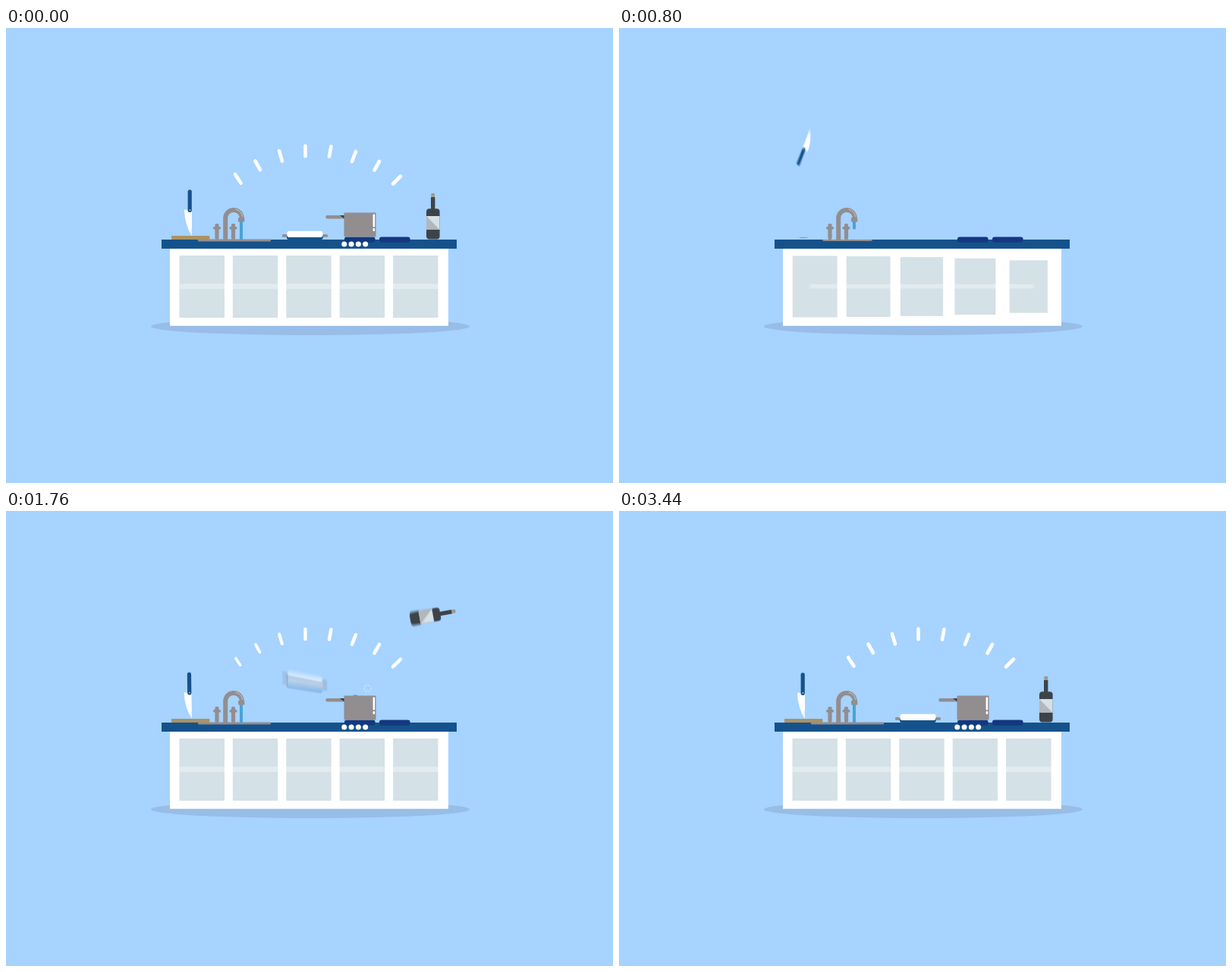
An HTML page with a canvas that plays this animation: 800x600 px, repeating every 5000 ms.

```html
<!DOCTYPE html>
<html lang="en">
<head>
<meta charset="utf-8">
<title>Kitchen counter</title>
<style>
html, body { margin: 0; width: 100%; height: 100%; overflow: hidden; background: #a6d3ff; }
canvas { display: block; }
</style>
</head>
<body>
<canvas id="stage" width="800" height="600"></canvas>
<script>
const LOOP = 5000, STEP = 40, SHUTTER = 16, SAMPLES = 8;
const BLUE = '#15528c', NAVY = '#14387f', GRAY = '#928e8f', GLASS = '#d4e1e6', DARK = '#3d4449';

const screen = document.getElementById('stage').getContext('2d');
const layer = document.createElement('canvas');
layer.width = 800;
layer.height = 600;
const c = layer.getContext('2d');

const clamp = v => Math.min(1, Math.max(0, v));
const easeOut = (p, n = 4) => 1 - (1 - clamp(p)) ** n;
const easeIn = (p, n = 3) => clamp(p) ** n;
const pop = (t, start, dur = 540) => easeOut((t - start) / dur);

function box(x, y, x2, y2, color, r = 0) {
  c.fillStyle = color;
  c.beginPath();
  c.roundRect(x, y, x2 - x, y2 - y, r);
  c.fill();
}

function dot(x, y, r, color) {
  c.fillStyle = color;
  c.beginPath();
  c.arc(x, y, r, 0, Math.PI * 2);
  c.fill();
}

function poly(points, color) {
  c.fillStyle = color;
  c.beginPath();
  points.forEach(p => c.lineTo(p[0], p[1]));
  c.fill();
}

// Draws a part scaled and turned about (x, y), moved down by dy.
function part(x, y, scale, draw, deg = 0, dy = 0) {
  if (scale <= 0) return;
  c.save();
  c.translate(x, y + dy);
  c.rotate(deg * Math.PI / 180);
  c.scale(scale, scale);
  c.translate(-x, -y);
  draw();
  c.restore();
}

// A toss: grows while rising, then drops back after 640 ms.
function toss(u, height) {
  const size = easeOut(u / 460);
  return { size, dy: -height * size * (1 - easeIn((u - 400) / 240)) };
}

function settle(u, amp) {
  return u < 0 ? 0 : amp * Math.exp(-u / 90) * Math.sin(u * Math.PI / 160);
}

function cabinet(t) {
  part(401, 393.5, easeOut((t - 80) / 420, 3), () => {
    c.fillStyle = '#98bde6';
    c.beginPath();
    c.ellipse(401, 393.5, 210, 11.5, 0, 0, Math.PI * 2);
    c.fill();
  });
  part(399.5, 341.5, easeOut((t - 80) / 420, 3), () => box(216, 290, 583, 392.7, '#fff'));
  for (let i = 0; i < 5; i++) {
    const x = 228.5 + i * 70.4;
    part(x + 29.7, 341, pop(t, 440 + i * 40), () => box(x, 300, x + 59.4, 382, GLASS));
  }
  part(399, 340.7, pop(t, 584), () => box(228.5, 337.2, 569.5, 344.2, 'rgba(255,255,255,.32)'));
  part(399.5, 285, pop(t, 120, 500), () => box(205, 279, 594, 291, BLUE));
}

function tap(x) {
  box(x - 2.6, 258, x + 2.6, 279, GRAY, 2);
  box(x - 5, 262, x + 5, 265.5, GRAY, 1.5);
}

function sink(t) {
  part(301, 280, pop(t, 666), () => box(253, 278.5, 349, 281.5, GRAY, 1));
  const flow = pop(t, 730);
  if (flow > 0) box(308, 255, 312, 255 + 24 * flow, '#4aa3d6');
  part(278, 271, pop(t, 200, 480), () => tap(278));
  part(299.5, 271, pop(t, 240, 500), () => tap(299.5));
  part(300, 260, pop(t, 160, 507), () => {
    c.strokeStyle = GRAY;
    c.lineWidth = 6;
    c.beginPath();
    c.moveTo(289.2, 279);
    c.lineTo(289.2, 250.7);
    c.arc(300, 250.7, 10.8, Math.PI, 0);
    c.stroke();
    box(306, 250, 314.3, 255.8, GRAY, 1);
    c.strokeStyle = '#c9c6c7';
    c.lineWidth = 1;
    c.beginPath();
    c.arc(300, 250.7, 11.8, -1.35, -0.15);
    c.stroke();
  });
}

function bubble(t, start, x, rise, r) {
  const u = t - start;
  if (u < 0 || u > 400) return;
  const y = 250 - rise * easeOut(u / 240, 2);
  if (u < 240) return dot(x, y, r * clamp(0.6 + u / 150), BLUE);
  if (u > 480) return;
  c.globalAlpha = 1 - easeIn((u - 320) / 160);
  for (let i = 0; i < 10; i++) {
    const a = i * Math.PI / 5, d = r + 0.6;
    dot(x + Math.cos(a) * d, y + Math.sin(a) * d, 0.8, '#e6f2ff');
  }
  c.globalAlpha = 1;
}

function stove(t) {
  [446, 492].forEach((x, i) =>
    part(x + 20.2, 279, pop(t, 300 + i * 40, 460), () => box(x, 275.4, x + 40.6, 282.8, NAVY, 3)));
  for (const start of [1340, 1740]) {
    bubble(t, start, 460.5, 21, 4.7);
    bubble(t, start + 30, 476.5, 16, 4);
  }
  part(466, 260, pop(t, 820), () => {
    box(421.3, 247, 447, 251.5, GRAY, 2);
    poly([[440, 247], [446, 247], [446, 251.5]], '#273c5c');
    box(445.5, 243.5, 487.6, 275.5, GRAY, 1);
    box(483.6, 245.5, 486.2, 262.5, '#fff', 1);
    box(483.6, 264, 486.2, 268, '#fff', 1);
  });
  for (let i = 0; i < 4; i++) {
    const x = 445.8 + i * 9.3;
    part(x, 285, pop(t, 840 + i * 30, 480), () => dot(x, 285, 3.5, '#fff'));
  }
}

function knifeShape() {
  c.fillStyle = '#fff';
  c.beginPath();
  c.moveTo(235, 239.5);
  c.lineTo(245, 240.5);
  c.lineTo(245, 274);
  c.quadraticCurveTo(235.5, 260, 235, 239.5);
  c.fill();
  poly([[245, 262], [245, 274], [242.5, 268]], '#eef3f6');
  box(239.6, 213.3, 244.8, 243, BLUE, 2.5);
  dot(242.4, 240, 0.9, '#b9c9d8');
}

function knife(t) {
  part(243.2, 276.5, pop(t, 770), () => box(218, 274, 268.4, 279, '#ab9264', 1));
  const u = t - 640;
  if (u < 640) {
    const f = toss(u, 105);
    part(243.5, 243.5, f.size, knifeShape, 201 + (u - 160) * 0.331, f.dy);
  } else {
    const w = u - 640;
    const deg = -9 * Math.exp(-w / 260) * Math.sin(w * Math.PI / 220);
    part(244.5, 274, 1, knifeShape, deg, -3 * Math.exp(-w / 260));
  }
}

function dish(t) {
  const u = t - 1160, f = toss(u, 116);
  part(394, 273, f.size, () => {
    box(364, 272, 424, 275.8, GRAY, 1.5);
    box(370, 272, 417.7, 279, BLUE, 2.5);
    box(370.3, 267.7, 417.5, 276, '#fff', 3);
  }, Math.max(0, 68 - (u - 280) * 0.181), f.dy + settle(u - 640, 9));
}

function corkShift(t) {
  return -87 * easeOut((t - 2240) / 600, 3) * (1 - easeIn((t - 2840) / 560));
}

function bottle(t) {
  const u = t - 1280, f = toss(u, 115);
  part(562.8, 248, f.size, () => {
    const y = 218 + corkShift(t);
    box(560.4, y, 565, y + 9, '#969497', 0.8);
    box(561.7, y + 2, 563.9, y + 7, '#b59e78');
    box(560, 223, 565.4, 242, DARK, 0.8);
    box(554, 238.3, 571.6, 278.5, DARK, 4);
    box(554, 248, 571.6, 266, GLASS);
    poly([[554, 248], [571.6, 266], [554, 266]], '#b2b7bb');
  }, Math.max(0, 293 - u * 0.444), f.dy + settle(u - 640, 20));
}

const rays = [
  [302, 193, 309.5, 204.5], [328.5, 175.5, 335, 187], [360, 162, 364, 175.5], [394.5, 155.5, 394.5, 169.3],
  [428.5, 156, 426, 169.5], [461, 163, 456, 176], [492, 176, 485.5, 187.5], [520, 195.5, 510, 205.5]
];

function burst(t) {
  rays.forEach(([x, y, x2, y2], i) =>
    part((x + x2) / 2, (y + y2) / 2, pop(t, 1590 - i * 42), () => {
      c.strokeStyle = '#fff';
      c.lineWidth = 4.6;
      c.lineCap = 'round';
      c.beginPath();
      c.moveTo(x, y);
      c.lineTo(x2, y2);
      c.stroke();
      c.lineCap = 'butt';
    }));
}

function scene(t) {
  c.fillStyle = '#a6d3ff';
  c.fillRect(0, 0, 800, 600);
  for (const draw of [cabinet, sink, stove, knife, dish, bottle, burst]) draw(t);
}

// Averages several moments inside the shutter time for motion blur.
function render(t) {
  const still = t < STEP || t >= 3440;
  const count = still ? 1 : SAMPLES;
  for (let k = 0; k < count; k++) {
    scene(still ? LOOP : t + SHUTTER * ((k + 0.5) / count - 0.5));
    screen.globalAlpha = 1 / (k + 1);
    screen.drawImage(layer, 0, 0);
  }
}

const begin = performance.now();
let shown = -1;

function tick() {
  const now = (performance.now() - begin) % LOOP;
  const step = Math.floor(now / STEP);
  if (step !== shown) render((shown = step) * STEP);
  requestAnimationFrame(tick);
}
tick();
</script>
</body>
</html>
```
